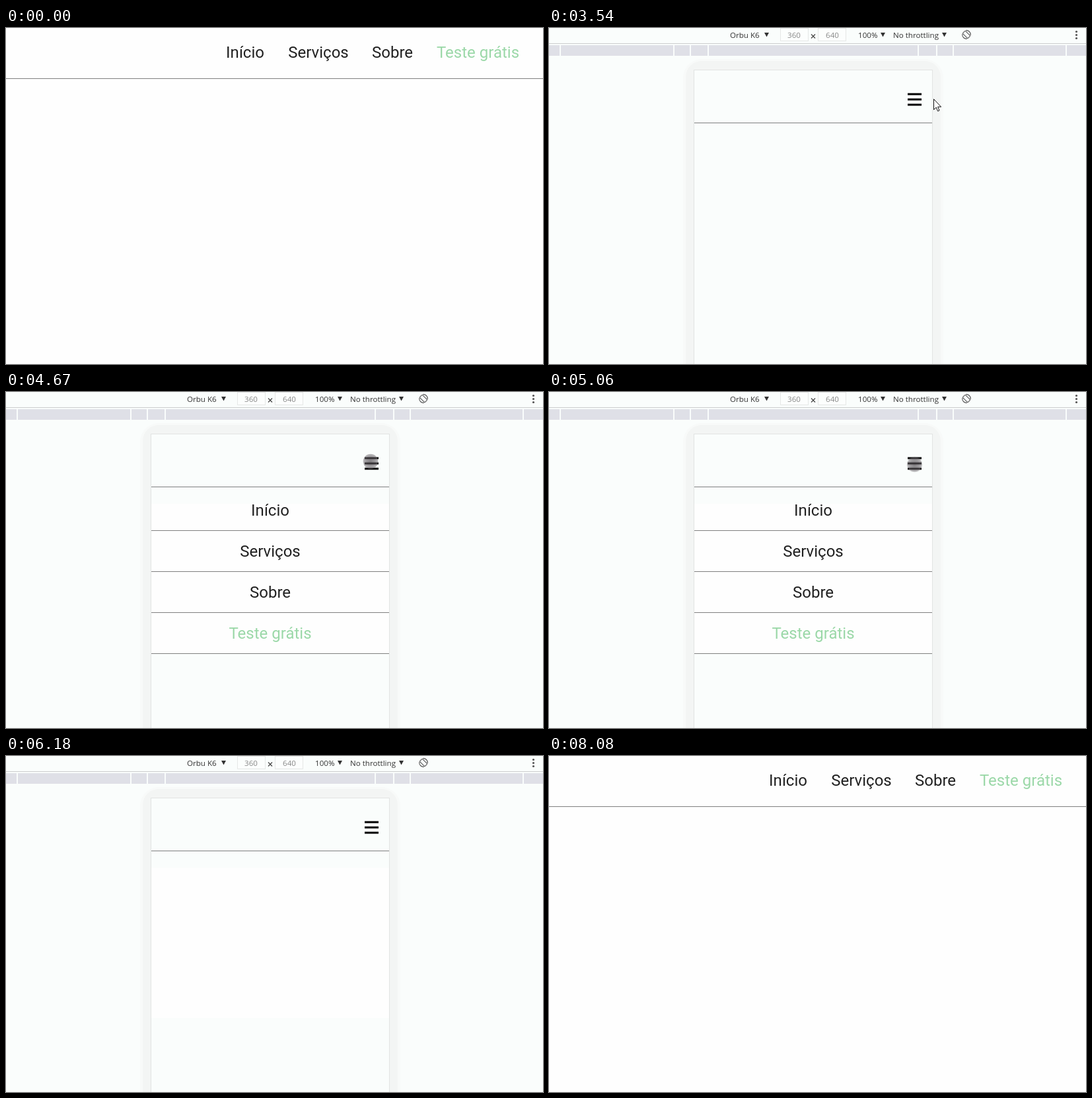
Animation of 813x508 px, one loop 8320 ms. Source, as an HTML page:

```html
<!DOCTYPE html>
<html lang="pt">
<head>
<meta charset="utf-8">
<title>Menu responsivo</title>
<style>
  html, body { margin: 0; width: 100%; height: 100%; overflow: hidden; background: #fefefe; }
  svg { display: block; position: absolute; left: 0; top: 0; }
  .link { font: 24px Roboto, sans-serif; text-anchor: middle; fill: #212121; }
  .cta { fill: #9bd8a8; }
  .tool { font: 11.6px "Open Sans", "Noto Sans", sans-serif; fill: #333; }
  .size { text-anchor: middle; fill: #888; }
  .rule { fill: #808080; }
  #mobile, #menu, #veil, #arrow, #touch { opacity: 0; }
</style>
</head>
<body>
<svg width="813" height="508" viewBox="0 0 813 508">
  <defs>
    <radialGradient id="press">
      <stop offset="0" stop-color="#4c474c" stop-opacity=".7"/>
      <stop offset=".6" stop-color="#5a555a" stop-opacity=".6"/>
      <stop offset="1" stop-color="#757075" stop-opacity=".5"/>
    </radialGradient>
  </defs>

  <g id="desktop">
    <rect width="813" height="508" fill="#fefefe"/>
    <rect class="rule" y="76" width="813" height="1"/>
  </g>

  <g id="mobile">
    <rect width="813" height="508" fill="#fafdfc"/>
    <g class="tool">
      <text x="274" y="15">Orbu K6</text>
      <text x="468" y="15">100%</text>
      <text x="521" y="15">No throttling</text>
      <path d="M326 7h7l-3.5 6.5zM502 7h7l-3.5 6.5zM595 7h7l-3.5 6.5z"/>
      <g fill="#fcfefd" stroke="#e6e8e7">
        <rect x="350.5" y=".5" width="42" height="19"/>
        <rect x="407.5" y=".5" width="42" height="19"/>
      </g>
      <text class="size" x="371" y="15">360</text>
      <text class="size" x="429" y="15">640</text>
      <path d="M397 9.5l6 6m0-6l-6 6" stroke="#444" stroke-width="1.2"/>
      <g transform="translate(632 10)" fill="none" stroke="#555" stroke-width="1.1">
        <rect x="-2.8" y="-5.5" width="5.6" height="11" rx="1" transform="rotate(-45)"/>
        <path d="M-1 -6.3A6.3 6.3 0 0 1 6.2 1M1 6.3A6.3 6.3 0 0 1 -6.2 -1"/>
      </g>
      <g fill="#555">
        <circle cx="798.5" cy="5.5" r="1.6"/>
        <circle cx="798.5" cy="10.5" r="1.6"/>
        <circle cx="798.5" cy="15.5" r="1.6"/>
      </g>
    </g>
    <rect y="23" width="813" height="1" fill="#cbcdcd"/>
    <rect y="26" width="813" height="16" fill="#dfe0e7"/>
    <g id="ticks" fill="#fafdfc"></g>

    <rect x="203" y="47" width="394" height="500" rx="28" fill="#f8faf9"/>
    <rect x="207" y="50" width="386" height="500" rx="24" fill="#f3f5f4"/>
    <rect x="219.5" y="63.5" width="361" height="480" fill="#fafdfc" stroke="#e2e4e3"/>
    <rect id="veil" x="220" y="169" width="360" height="227" fill="#fefefe"/>
    <g id="menu"></g>
    <rect class="rule" x="220" y="143" width="360" height="1"/>
    <path d="M543 100h21M543 108h21M543 116h21" stroke="#000" stroke-width="3"/>

    <circle id="touch" r="11.3" fill="url(#press)"/>
    <path id="arrow" d="M.5 .5V16.5L4.2 13L6.6 18.7L9 17.7L6.6 12.2H11.6Z" fill="#fff" stroke="#111"/>
  </g>
</svg>
<script>
const LOOP = 8320;
const $ = id => document.getElementById(id);

function add(parent, tag, attrs, text = '') {
  const el = document.createElementNS('http://www.w3.org/2000/svg', tag);
  for (const key in attrs) el.setAttribute(key, attrs[key]);
  el.textContent = text;
  parent.append(el);
}

for (const x of [16, 188, 213, 240, 558, 586, 611, 782])
  add($('ticks'), 'rect', { x, y: 26, width: 2, height: 16 });

[['Início', 362], ['Serviços', 473], ['Sobre', 585], ['Teste grátis', 714.5]].forEach(([label, x], i) => {
  const cls = i === 3 ? 'link cta' : 'link';
  add($('desktop'), 'text', { class: cls, x, y: 45 }, label);
  add($('menu'), 'text', { class: cls, x: 400, y: 187 + 62 * i }, label);
  add($('menu'), 'rect', { class: 'rule', x: 220, y: 209 + 62 * i, width: 360, height: 1 });
});

// Each step [ms, props] holds until the next one.
function hold(id, steps) {
  const frames = [...steps, [LOOP, steps.at(-1)[1]]].map(([ms, props]) =>
    ({ offset: ms / LOOP, easing: 'steps(1, end)', ...props }));
  $(id).animate(frames, { duration: LOOP, iterations: Infinity });
}

const show = (id, from, to) =>
  hold(id, [[0, { opacity: 0 }], [from, { opacity: 1 }], [to, { opacity: 0 }]]);

const hidden = ms => [ms, { opacity: 0, transform: 'translate(0px, 0px)' }];

const trail = (start, gap, points) => points.map(([x, y], i) =>
  [start + i * gap, { opacity: 1, transform: `translate(${x}px, ${y}px)` }]);

show('mobile', 2520, 7090);
show('veil', 4240, 7090);
show('menu', 4240, 5780);

hold('arrow', [
  hidden(0),
  ...trail(3240, 300 / 7, [[770, 108], [752, 112], [725, 114], [690, 115],
    [655, 114], [625, 111], [600, 109], [582, 107]]),
  hidden(3580),
  ...trail(5860, 40, [[600, 99], [632, 107], [665, 109], [692, 106],
    [728, 99], [749, 88], [774, 77], [799, 75]]),
  hidden(6180)
]);

hold('touch', [
  hidden(0),
  ...trail(3580, 39, [[568, 106], [562, 106], [555, 104], [548, 103], [542, 102], [540, 102],
    [541, 103], [543, 104], [546, 104], [548, 105], [550, 105]]),
  ...trail(4640, 42, [[552, 105], [555, 106], [559, 107], [562, 108], [564, 109], [564, 110],
    [562, 110], [559, 110], [557, 110], [555, 110], [553.5, 109.5]]),
  ...trail(5780, 40, [[555, 109], [567, 106]]),
  hidden(5860)
]);
</script>
</body>
</html>
```
